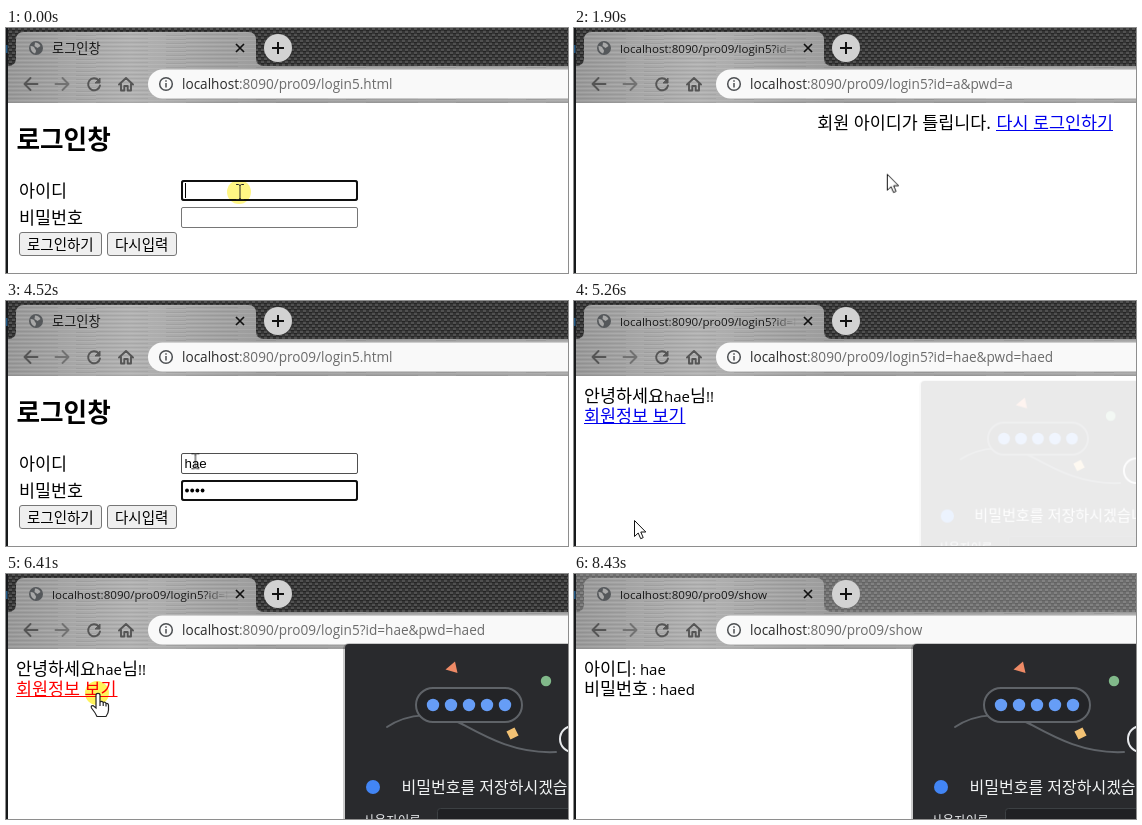
These frames come from a looping animation (562x245 px, 8500 ms). An HTML page:

```html
<!DOCTYPE html>
<html lang="ko">
<head>
<meta charset="utf-8">
<title>로그인창</title>
<style>
html, body { margin: 0; width: 100%; height: 100%; overflow: hidden; background: #fff; }
svg { display: block; width: 562px; height: 245px; }
text { font: 17.4px "Open Sans", "Noto Sans CJK KR", sans-serif; white-space: pre; }
.la { font-size: 15px; }
.head { font-size: 25.6px; font-weight: 700; }
.btn text { font-size: 14.5px; fill: #000; stroke: none; }
.field { font: 13.33px "Liberation Sans", Arial, sans-serif; }
.url { font-size: 13.6px; fill: #6b6b6b; }
.url tspan { fill: #2b2b2b; }
.tab { font-size: 11.6px; fill: url(#fade); }
.tab.ko { font-size: 13.2px; }
.link { fill: #00e; }
.line { fill: none; stroke-linecap: round; stroke-linejoin: round; }

/* every stepped change shares one clock */
.k { animation: 8.5s step-end infinite; }
.login { animation-name: login; }
.fail { animation-name: fail; }
.hello { animation-name: hello; }
.show { animation-name: show; }
.id-focus { animation-name: id-focus; }
.pw-focus { animation-name: pw-focus; }
.id-box { animation-name: id-hover; }
.pw-box { animation-name: pw-hover; }
.submit { animation-name: submit; }
.caret1 { animation-name: caret1; }
.caret2 { animation-name: caret2; }
.try { animation-name: try; }
.c1 { animation-name: c1; }
.c2 { animation-name: c2; }
.c3 { animation-name: c3; }
.d1 { animation-name: d1; }
.d2 { animation-name: d2; }
.d3 { animation-name: d3; }
.d4 { animation-name: d4; }
.press1 { animation-name: press1; }
.press2 { animation-name: press2; }
.popup { animation-name: popup; transform-origin: 480px 249px; }
.blur { animation-name: blur; }
.glow { animation-name: glow; }
.beam { animation-name: beam; }
.arrow { animation-name: arrow; }
.hand { animation-name: hand; }
.mouse { animation: move 8.5s linear infinite; }

@keyframes login { 0%, 25.52% { opacity: 1 } 16.11%, 60.23%, 100% { opacity: 0 } }
@keyframes fail { 0%, 25.52%, 100% { opacity: 0 } 16.11% { opacity: 1 } }
@keyframes hello { 0%, 76.94%, 100% { opacity: 0 } 60.23% { opacity: 1 } }
@keyframes show { 0% { opacity: 0 } 76.94%, 100% { opacity: 1 } }
@keyframes id-focus { 0%, 29.52% { opacity: 1 } 7.29%, 40%, 100% { opacity: 0 } }
@keyframes pw-focus { 0%, 16.11% { opacity: 0 } 7.29%, 40%, 100% { opacity: 1 } }
@keyframes id-hover { 0%, 53.65%, 100% { stroke: #767676 } 28.3% { stroke: #4f4f4f } }
@keyframes pw-hover { 0%, 10.2%, 100% { stroke: #767676 } 4.11% { stroke: #4f4f4f } }
@keyframes submit {
  0%, 16.11%, 60.23%, 100% { fill: #efefef; stroke: #767676 }
  12.2%, 56.4% { fill: #e4e4e4; stroke: #4f4f4f }
}
@keyframes caret1 { 0%, 29.52% { opacity: 1 } 3.29%, 34.23%, 100% { opacity: 0 } }
@keyframes caret2 { 0%, 16.11%, 100% { opacity: 0 } 8.94% { opacity: 1 } }
@keyframes try { 0%, 16.11%, 100% { opacity: 0 } 3.29% { opacity: 1 } }
@keyframes c1 { 0% { opacity: 0 } 34.23%, 100% { opacity: 1 } }
@keyframes c2 { 0% { opacity: 0 } 37.41%, 100% { opacity: 1 } }
@keyframes c3 { 0% { opacity: 0 } 38.23%, 100% { opacity: 1 } }
@keyframes d1 { 0%, 16.11% { opacity: 0 } 8.94%, 43.88%, 100% { opacity: 1 } }
@keyframes d2 { 0% { opacity: 0 } 43.88%, 100% { opacity: 1 } }
@keyframes d3 { 0% { opacity: 0 } 46.23%, 100% { opacity: 1 } }
@keyframes d4 { 0% { opacity: 0 } 47.76%, 100% { opacity: 1 } }
@keyframes press1 { 0%, 100% { fill: #00e; stroke: #00e } 24.7% { fill: red; stroke: red } }
@keyframes press2 { 0%, 100% { fill: #00e; stroke: #00e } 75.41% { fill: red; stroke: red } }
@keyframes popup {
  0% { opacity: 0; transform: scale(.944) }
  61.88% { opacity: .1; transform: scale(.944) }
  62.7% { opacity: .45; transform: scale(.968) }
  63.52% { opacity: .85; transform: scale(.99) }
  64.35%, 100% { opacity: 1; transform: none }
}
@keyframes blur { 0% { opacity: 0 } 98.47%, 100% { opacity: .28 } }
@keyframes glow {
  0% { opacity: .6 }
  7.29%, 14.47%, 24.7%, 29.52%, 58.7%, 75.41% { opacity: .8 }
  1.52%, 8.94%, 16.82%, 26.3%, 30.23%, 61.05%, 77.76%, 100% { opacity: 0 }
}
@keyframes beam {
  0%, 28.2%, 76.94% { opacity: 1 }
  10.2%, 53.65%, 83.7%, 100% { opacity: 0 }
}
@keyframes arrow {
  0%, 23%, 28.2%, 69.1%, 98.47%, 100% { opacity: 0 }
  10.2%, 25.52%, 53.65%, 83.7% { opacity: 1 }
}
@keyframes hand { 0%, 25.52%, 76.94%, 100% { opacity: 0 } 23%, 69.1% { opacity: 1 } }
/* 25.52%–28.2% and 53.65%–69.1% belong to the arrow */
@keyframes move {
  0%, 2.5% { transform: translate(234px, 164px) }
  4.94%, 8.94% { transform: translate(226px, 189px) }
  12.94%, 20% { transform: translate(71px, 219px) }
  24%, 25.52% { transform: translate(480px, 95px) }
  28.7%, 30.59% { transform: translate(215px, 163px) }
  31.88%, 52.47% { transform: translate(219px, 159px) }
  53.17% { transform: translate(190px, 160px) }
  57.06%, 66.71% { transform: translate(60px, 219px) }
  67.53% { transform: translate(88px, 190px) }
  68.35% { transform: translate(117px, 150px) }
  69.18% { transform: translate(106px, 128px) }
  69.88%, 83.29% { transform: translate(92px, 119px) }
  84.82% { transform: translate(115px, 126px) }
  86.47%, 88.12% { transform: translate(131px, 112px) }
  93.76%, 100% { transform: translate(253px, 224px) }
}
/* the hand is only raised over a link */
@keyframes hand { 0%, 25.52%, 76.94%, 100% { opacity: 0 } 23%, 69.1% { opacity: 1 } 53.65% { opacity: 0 } }
</style>
</head>
<body>
<svg viewBox="0 0 562 245">
  <defs>
    <pattern id="carbon" width="6" height="6" patternUnits="userSpaceOnUse">
      <rect width="6" height="6" fill="#353535"/>
      <path d="M0 0h3v2H0zM3 3h3v2H3z" fill="#515151"/>
      <path d="M0 2h3v1H0zM3 5h3v1H3z" fill="#252525"/>
    </pattern>
    <pattern id="brush" width="90" height="4" patternUnits="userSpaceOnUse">
      <path d="M0 .5h90" stroke="#fff" stroke-opacity=".1"/>
      <path d="M0 2.5h52M70 3.5h20" stroke="#000" stroke-opacity=".06"/>
    </pattern>
    <linearGradient id="metal" gradientUnits="userSpaceOnUse" x1="0" x2="562">
      <stop offset="0" stop-color="#989898"/>
      <stop offset=".22" stop-color="#b2b2b2"/>
      <stop offset=".45" stop-color="#9c9c9c"/>
      <stop offset="1" stop-color="#a6a6a6"/>
    </linearGradient>
    <linearGradient id="fade" gradientUnits="userSpaceOnUse" x1="196" x2="223">
      <stop offset="0" stop-color="#161616"/>
      <stop offset="1" stop-color="#161616" stop-opacity="0"/>
    </linearGradient>
    <path id="frame" d="M2 75V38Q10 38 10 30V12Q10 4 18 4H242Q250 4 250 12V30Q250 38 258 38H562V75Z"/>
  </defs>

  <!-- browser frame -->
  <rect width="562" height="245" fill="#fff"/>
  <rect width="562" height="40" fill="url(#carbon)"/>
  <rect class="k blur" width="562" height="40" fill="#fff"/>
  <use href="#frame" fill="url(#metal)"/>
  <use href="#frame" fill="url(#brush)"/>
  <rect width="2" height="245" fill="#17191b"/>
  <rect y="17" width="1.5" height="8" fill="#245a86"/>
  <circle cx="30" cy="20" r="7" fill="#55585b"/>
  <path d="M24.5 18q4 0 4.5 3 2 1 0 4.5-4.500-1.500-4.500-7.500M29 14.500q4 0 5.500 3.500l-3 2-3-2z" fill="#a8a8a8"/>
  <path d="M230 16l8 8m0-8l-8 8" stroke="#111" stroke-width="1.7"/>
  <circle cx="272" cy="20" r="14" fill="#d2d2d2"/>
  <path d="M266 20h12M272 14v12" stroke="#111" stroke-width="2"/>
  <g class="line" stroke="#555" stroke-width="1.9">
    <path d="M31.500 56H18.500M24.500 50l-6 6 6 6"/>
    <path d="M49.500 56h13M56.500 50l6 6-6 6" stroke="#727272"/>
    <path d="M92.600 52.300A6 6 0 1 0 94 57.500"/>
    <path d="M94 50.500v4.500h-4.500z" fill="#555" stroke-width="1"/>
    <path d="M113 56.500l7-6.500 7 6.500M115 55.500V62.500h3.300v-4.500h3.400v4.500h3.300v-7"/>
  </g>
  <rect x="142" y="41.500" width="450" height="29" rx="14.500" fill="#f9f9f9"/>
  <circle cx="160" cy="56" r="6.300" fill="none" stroke="#4c4f52" stroke-width="1.500"/>
  <path d="M160 55v4.500M160 52.300v1.500" stroke="#4c4f52" stroke-width="1.500"/>

  <!-- login form -->
  <g class="k login">
    <text class="tab ko" x="46" y="25">로그인창</text>
    <text class="url" x="176" y="61"><tspan>localhost</tspan>:8090/pro09/login5.html</text>
    <text class="head" x="10.500" y="120.500">로그인창</text>
    <text x="13" y="168.500">아이디</text>
    <text x="13" y="195.500">비밀번호</text>
    <rect class="k id-box" x="175.500" y="152.500" width="176" height="20" rx="1.500" fill="#fff"/>
    <rect class="k pw-box" x="175.500" y="179.500" width="176" height="20" rx="1.500" fill="#fff"/>
    <g fill="none" stroke="#101010" stroke-width="2">
      <rect class="k id-focus" x="176" y="153" width="175" height="19" rx="2"/>
      <rect class="k pw-focus" x="176" y="180" width="175" height="19" rx="2"/>
    </g>
    <path class="k caret1" d="M179.500 155v15" stroke="#000"/>
    <path class="k caret2" d="M184.500 182v15" stroke="#000"/>
    <text class="field k try" x="178.500" y="167">a</text>
    <text class="field k c1" x="178.500" y="167">h</text>
    <text class="field k c2" x="185.900" y="167">a</text>
    <text class="field k c3" x="193.300" y="167">e</text>
    <circle class="k d1" cx="181" cy="189.500" r="1.900"/>
    <circle class="k d2" cx="186.200" cy="189.500" r="1.900"/>
    <circle class="k d3" cx="191.400" cy="189.500" r="1.900"/>
    <circle class="k d4" cx="196.600" cy="189.500" r="1.900"/>
    <g class="btn" fill="#efefef" stroke="#767676">
      <rect class="k submit" x="13.500" y="204.500" width="82" height="23" rx="2.500"/>
      <rect x="101.500" y="204.500" width="69" height="23" rx="2.500"/>
      <text x="21" y="221.500">로그인하기</text>
      <text x="109" y="221.500">다시입력</text>
    </g>
  </g>

  <!-- rejected -->
  <g class="k fail">
    <text class="tab" x="46" y="24.500">localhost:8090/pro09/login5?id=a&amp;pwd=a</text>
    <text class="url" x="176" y="61"><tspan>localhost</tspan>:8090/pro09/login5?id=a&amp;pwd=a</text>
    <text x="417" y="100.500" text-anchor="end">회원 아이디가 틀립니다.</text>
    <g class="k press1">
      <text x="539" y="100.500" text-anchor="end" stroke="none">다시 로그인하기</text>
      <path d="M422 102.500H539"/>
    </g>
  </g>

  <!-- welcome -->
  <g class="k hello">
    <text class="tab" x="46" y="24.500">localhost:8090/pro09/login5?id=hae&amp;pwd=haed</text>
    <text class="url" x="176" y="61"><tspan>localhost</tspan>:8090/pro09/login5?id=hae&amp;pwd=haed</text>
    <text x="10" y="100.500">안녕하세요<tspan class="la">hae</tspan>님<tspan class="la">!!</tspan></text>
    <g class="k press2">
      <text x="10" y="121" stroke="none">회원정보 보기</text>
      <path d="M10 122.500H111.500"/>
    </g>
  </g>

  <!-- member details -->
  <g class="k show">
    <text class="tab" x="46" y="24.500">localhost:8090/pro09/show</text>
    <text class="url" x="176" y="61"><tspan>localhost</tspan>:8090/pro09/show</text>
    <text x="10" y="100.500">아이디<tspan class="la">: hae</tspan></text>
    <text x="10" y="121">비밀번호<tspan class="la"> : haed</tspan></text>
  </g>

  <!-- save password bubble -->
  <g class="k popup">
    <rect x="337" y="69" width="330" height="330" rx="6" fill="#000" opacity=".2"/>
    <rect x="339" y="70" width="330" height="330" rx="4" fill="#292a2d"/>
    <path class="line" d="M381 153C402 139 432 137 456 150S510 180 550 178" stroke="#5f6368" stroke-width="2"/>
    <rect x="410" y="114" width="106" height="34" rx="17" fill="#232427" stroke="#5f6368" stroke-width="2"/>
    <g fill="#669df6">
      <circle cx="427" cy="131" r="6.200"/>
      <circle cx="445" cy="131" r="6.200"/>
      <circle cx="463" cy="131" r="6.200"/>
      <circle cx="481" cy="131" r="6.200"/>
      <circle cx="499" cy="131" r="6.200"/>
    </g>
    <path d="M439.500 95.500L449 87.500 451.500 99z" fill="#ee8a66"/>
    <circle cx="540" cy="107" r="5.200" fill="#81b98a"/>
    <rect x="502" y="155" width="9" height="9" fill="#f3c274" transform="rotate(-27 506.500 159.500)"/>
    <circle cx="567" cy="165" r="13" fill="#292a2d" stroke="#e8eaed" stroke-width="2"/>
    <circle cx="367" cy="213" r="7" fill="#4285f4"/>
    <text x="395.500" y="218.500" fill="#f1f3f4" style="font-size:16px">비밀번호를 저장하시겠습니까?</text>
    <text x="357" y="251" fill="#e8eaed" style="font-size:12.600px">사용자이름</text>
    <rect x="431.500" y="234.500" width="200" height="30" rx="3" fill="#202124" stroke="#3c4043"/>
  </g>

  <!-- pointer -->
  <g class="mouse">
    <circle class="k glow" r="12" cx="-1" fill="#fff032" style="mix-blend-mode:multiply"/>
    <path class="k beam line" d="M-3.500-7.500H-1.500L0-6.500 1.500-7.500H3.500M0-6.500V6.500M-3.500 7.500H-1.500L0 6.500 1.500 7.500H3.500" stroke="#222"/>
    <path class="k arrow" d="M.5.500V16.500L4.200 13 6.700 18.700 9.200 17.600 6.800 12H11.800Z" fill="#fff" stroke="#111"/>
    <path class="k hand" d="M-2 2Q-2 .300 0 .300T2 2V9Q4 7.500 5.200 9.500 7 8.500 8 10.500 10.500 10 10.500 12.500V17Q10.500 20 8 23.500H-1Q-2.500 20-6.500 15-7.500 12.500-5 12.600L-2 15ZM2 9v4M5.200 9.500V13M8 10.500V13.500" fill="#fff" stroke="#222" stroke-width="1.200"/>
  </g>
</svg>
</body>
</html>
```
